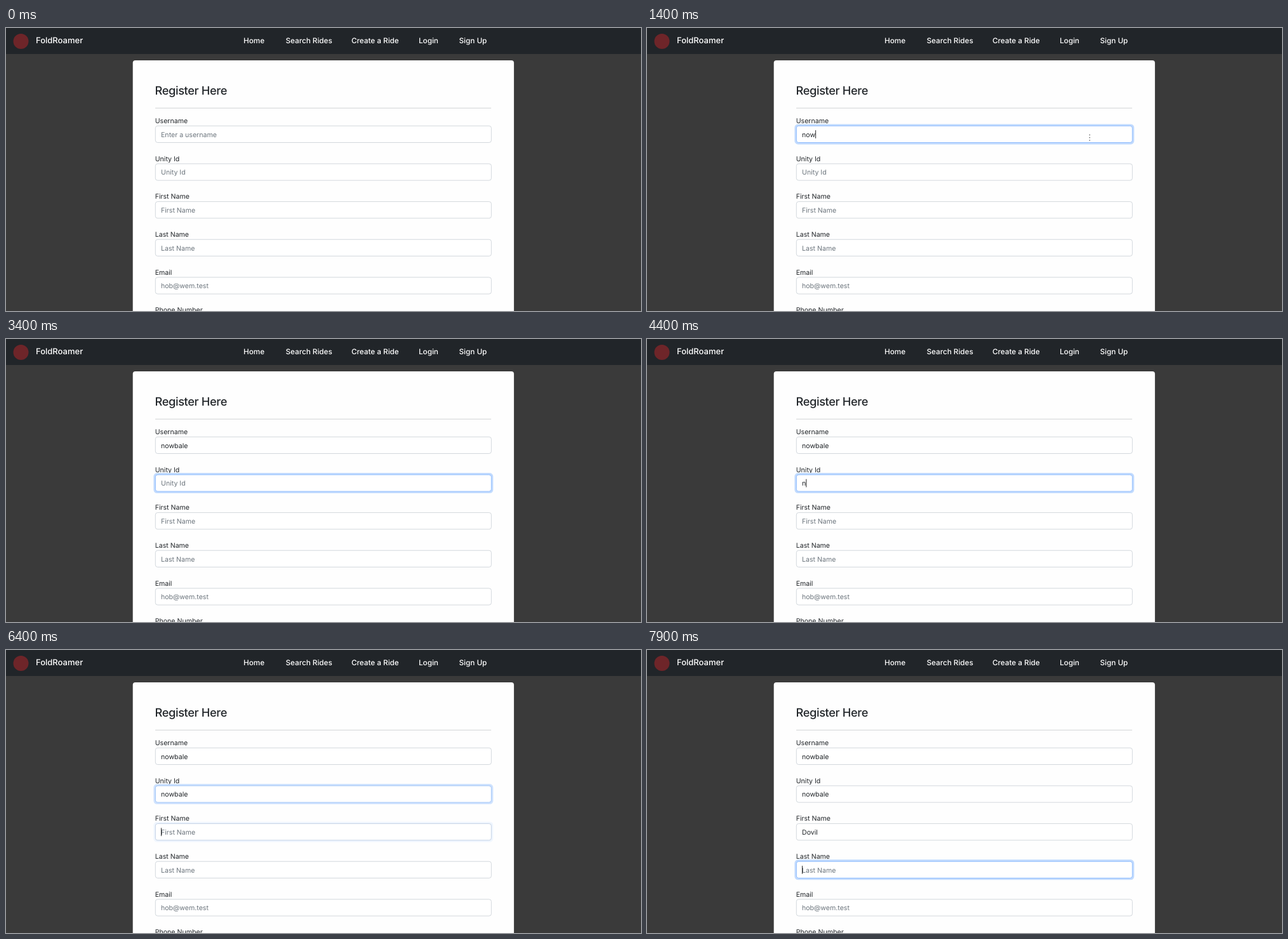
Recreate the animation shown at these times as an HTML page. Size 1000 px wide and 446 px high, loop 8 s.

```html
<!DOCTYPE html>
<html lang="en">
<head>
<meta charset="utf-8">
<title>Register</title>
<style>
  html, body { margin: 0; width: 100%; height: 100%; overflow: hidden; background: #3a3a3a; }
  svg { display: block; width: 100%; height: 100%; }
  text { font-family: Inter, Roboto, sans-serif; font-size: 10.6px; fill: #212529; text-rendering: geometricPrecision; }
  .nav { font-size: 11.7px; font-weight: 500; fill: #fff; }
  .brand { font-size: 13px; font-weight: 500; fill: #fff; }
  .title { font-size: 18.2px; font-weight: 500; letter-spacing: -.35px; }
</style>
</head>
<body>
<svg id="stage" viewBox="0 0 1000 446"></svg>
<script>
const LOOP = 8000, STEP = 100, FADE = 130, BLINK = 500;
const LEFT = 235.3, TEXT_X = 244, ROW = 59.65;
const stage = document.getElementById('stage');

function add(tag, attrs, text, parent = stage) {
  const el = document.createElementNS('http://www.w3.org/2000/svg', tag);
  for (const k in attrs) el.setAttribute(k, attrs[k]);
  if (text) el.textContent = text;
  parent.append(el);
  return el;
}
const set = (el, attrs) => { for (const k in attrs) el.setAttribute(k, attrs[k]); };
const clamp = v => Math.min(1, Math.max(0, v));
const smooth = v => v * v * (3 - 2 * v);
const mix = (a, b, p) => `rgb(${a.map((v, i) => Math.round(v + (b[i] - v) * p))})`;

// focus / blur times, then the time of each keystroke
const fields = [
  { label: 'Username', hint: 'Enter a username', text: 'nowbale', on: 900, off: 2900,
    keys: [1000, 1200, 1400, 1800, 1800, 2000, 2200] },
  { label: 'Unity Id', hint: 'Unity Id', text: 'nowbale', on: 2900, off: 6400,
    keys: [4400, 4500, 4600, 4800, 4900, 5100, 5300] },
  { label: 'First Name', hint: 'First Name', text: 'Dovil', on: 6400, off: 7800,
    keys: [6800, 7000, 7100, 7200, 7400] },
  { label: 'Last Name', hint: 'Last Name', text: '', on: 7800, off: LOOP, keys: [] },
  { label: 'Email', hint: 'hob@wem.test', text: '', on: LOOP, off: LOOP, keys: [] },
  { label: 'Phone Number', hint: '', text: '', on: LOOP, off: LOOP, keys: [] }
];

// page
add('rect', { width: 1000, height: 446, fill: '#3a3a3a' });
add('rect', { width: 1000, height: 41, fill: '#212529' });
add('circle', { cx: 23.5, cy: 21, r: 12, fill: '#6e2529' });
add('text', { x: 47, y: 23.5, class: 'brand' }, 'FoldRoamer');
[['Home', 374], ['Search Rides', 440.5], ['Create a Ride', 544], ['Login', 650], ['Sign Up', 713.5]]
  .forEach(([name, x]) => add('text', { x, y: 24, class: 'nav' }, name));
add('rect', { x: 199.7, y: 51, width: 600.2, height: 420, rx: 4, fill: '#fefefe' });
add('text', { x: 234.5, y: 104.5, class: 'title' }, 'Register Here');
add('rect', { x: 235, y: 125.7, width: 529, height: 1, fill: '#d2d3d4' });

// form rows
fields.forEach((f, i) => {
  const y = 154.3 + i * ROW;
  add('text', { x: 234.7, y: y - 4.4 }, f.label);
  f.glow = add('rect', { x: LEFT - 2.9, y: y - 2.9, width: 534.8, height: 32, rx: 5.5, fill: '#c2dbfe' });
  f.box = add('rect', { x: LEFT, y, width: 529, height: 26.2, rx: 3.5, fill: '#fff', 'stroke-width': .9 });
  f.value = add('text', { x: TEXT_X, y: y + 17.3 });
  f.caret = add('rect', { y: y + 6.8, width: .9, height: 12.8, fill: '#111' });
});

// pointer shapes
const arrow = add('path', { d: 'M0 0V11L2.6 8.6 4.3 12.4 6 11.6 4.4 8H7.8Z', fill: '#111', stroke: '#fff', 'stroke-width': .8 });
const beam = add('path', { d: 'M-.6 -4.2H.8M-.6 0H.8M-.6 4.2H.8', stroke: '#666', 'stroke-width': 1.5, fill: 'none' });

function drawField(f, t) {
  const ease = start => smooth(clamp((t - start + 40) / FADE));
  const focus = t < f.on ? 0 : t < f.off ? ease(f.on) : 1 - ease(f.off);
  const typed = f.keys.filter(k => t >= k);
  const text = f.text.slice(0, typed.length);
  set(f.glow, { opacity: focus });
  set(f.box, { stroke: mix([206, 212, 218], [134, 183, 254], focus) });
  f.value.textContent = text || f.hint;
  f.value.style.fill = text ? '#212529' : '#6c757d';

  const last = typed.length ? typed[typed.length - 1] : f.on;
  const lit = t >= f.on && t < f.off && Math.floor((t - last) / BLINK) % 2 === 0;
  const width = text ? f.value.getComputedTextLength() : 0;
  set(f.caret, { x: TEXT_X + width + .1, opacity: lit ? 1 : 0 });
}

function drawPointer(t) {
  const p = 1 - (1 - clamp((t - 100) / 700)) ** 3;
  const x = 716 - 19 * p, y = 450 - 277.3 * p;
  const inField = y < 181;
  const place = `translate(${x} ${y})`;
  set(arrow, { transform: place, opacity: t >= 100 && !inField ? 1 : 0 });
  set(beam, { transform: place, opacity: inField && t < 1800 ? 1 : 0 });
}

function render(now) {
  const t = Math.floor((now % LOOP) / STEP) * STEP;
  fields.forEach(f => drawField(f, t));
  drawPointer(t);
}

const origin = performance.now();
function tick() {
  render(performance.now() - origin);
  requestAnimationFrame(tick);
}
tick();
</script>
</body>
</html>
```
